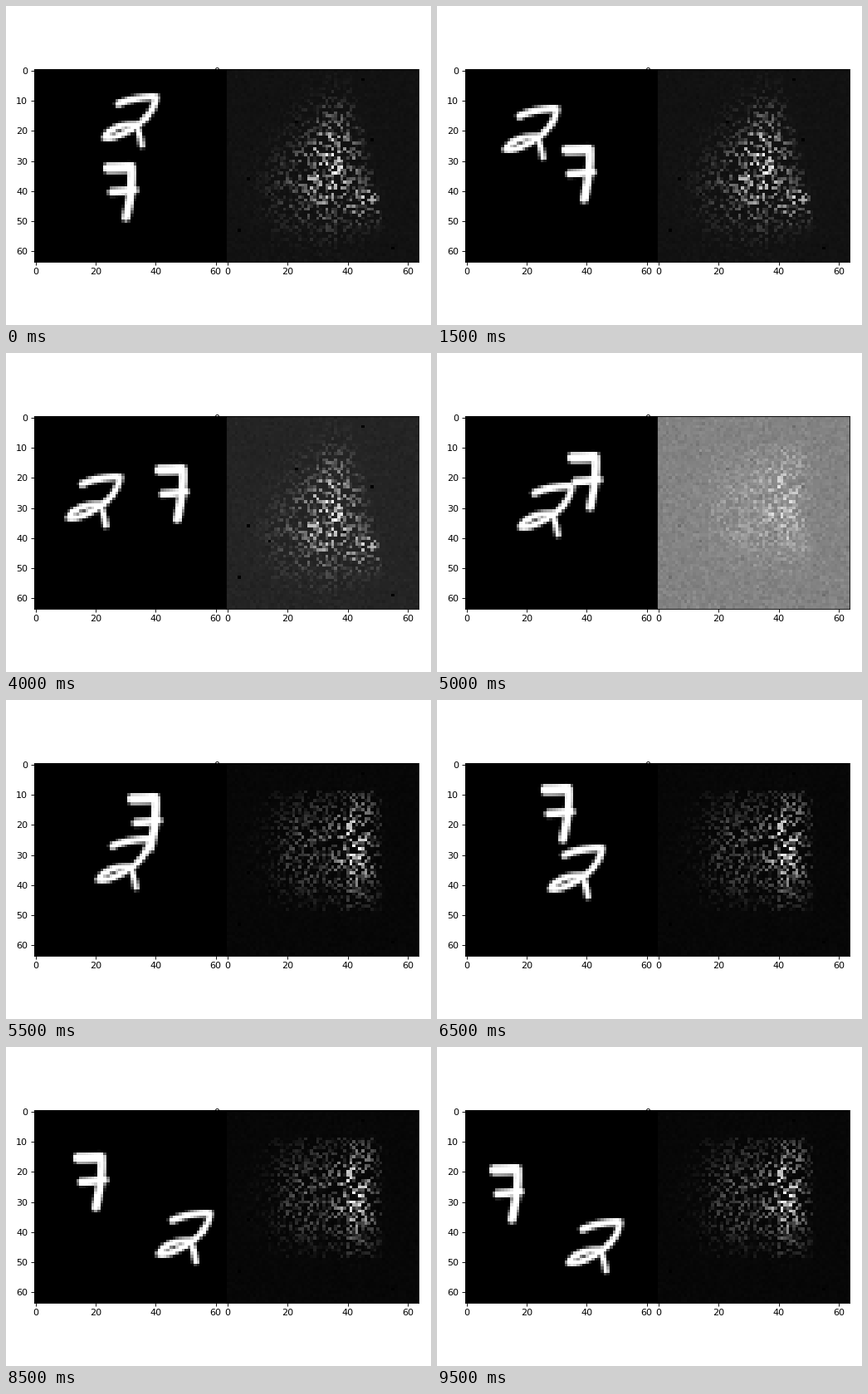
Write a matplotlib script that moves like this. It is 512 by 384 pixels and loops after 10000 ms.

```python
import numpy as np
import matplotlib.pyplot as plt
from matplotlib.animation import FuncAnimation

W, H, DPI = 512, 384, 80
SIZE, FRAMES, INTERVAL = 64, 20, 500
ROWS, COLS = np.mgrid[0:SIZE, 0:SIZE]

# Brush strokes: half width, then start, control and end of a curve, in cells
TWO = [
    (1.2, (6.0, 3.6), (11, 1.3), (18, 1.2)),
    (1.1, (18.5, 1.3), (17.6, 7.5), (10.5, 11.8)),
    (1.1, (10.5, 11.8), (4.5, 15.4), (1.5, 14.7)),
    (1.1, (1.5, 14.7), (4, 10.2), (12, 10.4)),
    (1.0, (12, 10.4), (13, 13), (13.8, 17.3)),
]
SEVEN = [
    (1.75, (1.7, 1.9), (5, 1.9), (9, 1.7)),
    (1.4, (9.4, 1.6), (9.8, 9), (7.5, 18.2)),
    (1.35, (2.8, 9.8), (6, 9.6), (10.3, 9.2)),
]


def draw_glyph(strokes, left, top):
    x, y = COLS + 0.5 - left, ROWS + 0.5 - top
    ink = np.zeros((SIZE, SIZE))
    for half, *curve in strokes:
        a, b, c = np.array(curve)
        for t in np.linspace(0, 1, 40):
            px, py = (1 - t) ** 2 * a + 2 * t * (1 - t) * b + t * t * c
            dist = np.hypot(x - px, y - py)
            ink = np.maximum(ink, np.clip(half + 0.5 - dist, 0, 1))
    return ink


def bounce(start, speed, steps, limit=36):
    """Whole-cell position of a patch that stops at a wall and turns back."""
    pos = start
    for _ in range(steps):
        pos += speed
        if pos <= 0 or pos >= limit:
            pos = min(max(pos, 0), limit)
            speed = -speed
    return int(pos)


def digits(i):
    two = draw_glyph(TWO, bounce(18, -3.305, i) + 4, bounce(4.15, 1.47, i) + 4)
    seven = draw_glyph(SEVEN, bounce(16.7, 2.91, i) + 7,
                       bounce(24.01, -1.85, i) + 7)
    return np.maximum(two, seven)


def blob(weight, cx, cy, sx, sy):
    return weight * np.exp(-((COLS - cx) / sx) ** 2 / 2
                           - ((ROWS - cy) / sy) ** 2 / 2)


def sparkle(rng, density, inside):
    u = rng.random((SIZE, SIZE))
    spots = np.clip((u - 0.45) / 0.55, 0, 1) ** 1.4
    return np.clip(density, 0, 1.1) * np.where(inside, 1, 0.12) * spots


rng = np.random.default_rng(7)
tree = (blob(0.85, 35, 30, 6, 11) + blob(0.9, 46, 44, 3.5, 4)
        + blob(0.4, 28, 38, 9, 10))
block = blob(1.05, 43, 27, 5, 11) + blob(0.42, 27, 27, 8, 12)
FIRST = sparkle(rng, tree, COLS < 41 + 0.22 * ROWS)
SECOND = sparkle(rng, block, (COLS < 52) & (ROWS > 8) & (ROWS < 49))
GRAIN = rng.normal(0, 1, (SIZE, SIZE))
SPECKS = rng.random((SIZE, SIZE)) < 0.0025


def response(i):
    """The first pattern turns into the second while the base level swells."""
    mix = np.clip((i - 8) / 3, 0, 1)
    swell = 0.47 * ((i - 7) / 3) ** 1.7 if 7 < i <= 10 else 0
    base = 0.07 - 0.042 * mix + swell
    field = base + (0.003 + 0.035 * base) * GRAIN
    field = np.where(SPECKS, np.maximum(0, 2 * base - 0.6), field)
    pattern = (1 - mix) * FIRST + mix * SECOND
    return np.clip(field + 0.95 * (1 - swell) * pattern, 0, 1)


plt.rcParams.update({"font.family": "DejaVu Sans", "font.size": 10})
fig = plt.figure(figsize=(W / DPI, H / DPI), dpi=DPI, facecolor="white")
SIDE, LEFT = 231.4, 33.9


def panel(x, data):
    ax = fig.add_axes([x / W, 0.5 - SIDE / H / 2, SIDE / W, SIDE / H])
    image = ax.imshow(data, cmap="gray", vmin=0, vmax=1, aspect="auto",
                      interpolation="nearest")
    ax.set_xticks(range(0, SIZE, 20))
    ax.set_yticks(range(0, SIZE, 10))
    return image


left_image = panel(LEFT, digits(0))
right_image = panel(LEFT + SIDE, response(0))


def update(i):
    left_image.set_data(digits(i))
    right_image.set_data(response(i))
    return left_image, right_image


anim = FuncAnimation(fig, update, frames=FRAMES, interval=INTERVAL,
                     repeat=True, repeat_delay=0, blit=False)
plt.show()
```
